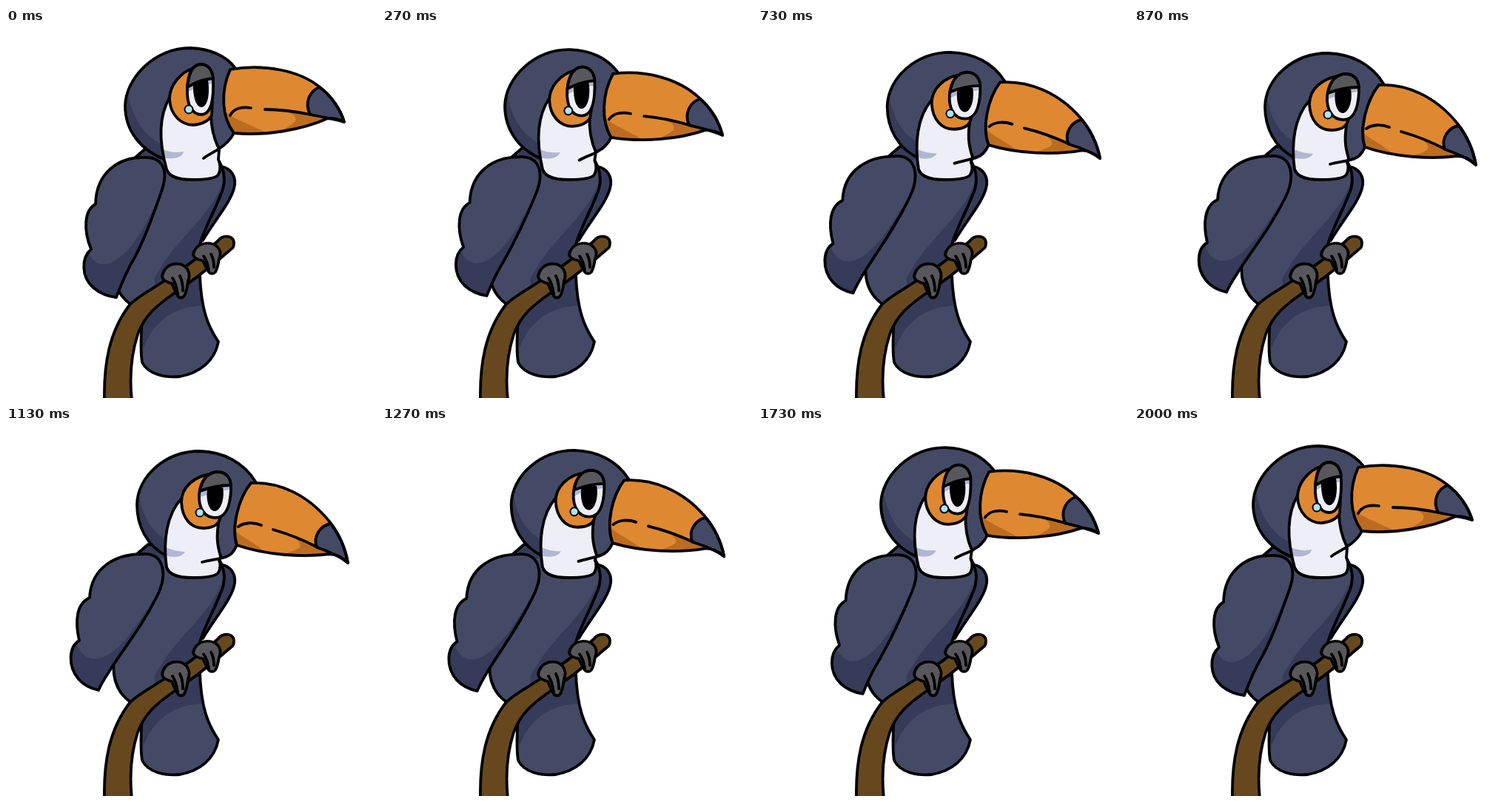
These frames come from a looping animation (500x500 px, 2070 ms). An HTML page:

```html
<!DOCTYPE html>
<html lang="en">
<head>
<meta charset="utf-8">
<title>Drowsy toucan</title>
<style>
  html, body { margin: 0; width: 100%; height: 100%; overflow: hidden; background: #fff; }
  svg { display: block; width: 100vw; height: 100vh; }
  .line { fill: none; stroke: #000; stroke-width: 3.8; stroke-linecap: round; stroke-linejoin: round; }
  .blue { fill: #444a65; }
  .navy { fill: #353b58; }
  .orange { fill: #de8832; }
  .rust { fill: #bc6c20; }
  .white { fill: #eeeef8; }
  .lilac { fill: #b1b7d2; }
</style>
</head>
<body>
<svg viewBox="0 0 500 500">
  <defs>
    <path id="back" d="M291 187C306 190 312 203 308 217C303 236 282 260 266 287L258 290L270 240Z"/>
    <path id="torso" d="M170 179L192 160L288 180C297 196 297 212 289 228C281 249 269 269 262 292L262 318C230 342 200 358 168 373C150 360 143 340 146 315C150 270 155 210 170 179Z"/>
    <path id="tail" d="M184 392C182 420 182 440 184 452C192 468 215 473 235 471C262 466 282 450 287 424C272 402 264 380 262 335L230 345Z"/>
    <path id="wing" d="M184 175C156 175 122 192 121 238C106 246 104 272 115 299C102 310 101 336 118 351C129 360 140 363 149 364C155 348 163 328 174 310C189 281 199 252 210 221C220 193 213 173 184 175Z"
      data-to="M184 173C150 173 115 190 113 232C95 240 93 264 99 290C85 298 83 324 98 342C105 350 116 355 125 357C130 345 137 336 145 323C165 293 185 268 203 232C220 200 213 170 184 173Z"/>
    <g class="turn">
      <path id="head" d="M216 178C181 165 161 138 161 105C162 68 200 27 249 27C275 28 295 36 309 53L308 142C303 152 296 158 288 163L267 176Z"
        data-to="M218 176C190 162 177 135 177 106C178 68 215 34 262 34C294 35 321 49 337 75L312 161C308 170 302 176 296 177L265 184Z"/>
      <path id="face" d="M221 94C206 120 207 155 217 191C221 202 234 205 252 205C272 205 284 203 287 198C290 193 290 184 287 178L288 164C281 150 277 135 277 116Z"
        data-to="M237 98C217 120 212 155 217 191C221 202 234 205 252 205C272 205 284 203 287 198C290 193 290 186 288 182L290 176C285 160 284 148 288 126Z"/>
      <path id="eye" d="M245 82C246 62 252 49 264 49C276 50 281 62 280 80C280 102 275 117 264 117C251 117 244 103 245 82Z"
        data-to="M261 92C263 74 272 62 287 62C300 63 304 74 304 86C303 108 297 124 283 124C268 124 260 111 261 92Z"/>
      <path id="beak" d="M303 56C350 48 398 58 424 80C440 92 452 110 457 127C450 123 443 122 435 122C400 138 350 146 308 142C291 120 290 85 303 56Z"
        data-to="M331 77C368 75 407 92 437 129C448 143 458 162 462 185C455 178 447 173 437 173C400 178 350 174 312 161C304 137 314 98 331 77Z"/>
    </g>
    <clipPath id="inTorso"><use href="#torso"/></clipPath>
    <clipPath id="inTail"><use href="#tail"/></clipPath>
    <clipPath id="inWing"><use href="#wing"/></clipPath>
    <clipPath id="inHead"><use href="#head"/></clipPath>
    <clipPath id="inFace"><use href="#face"/></clipPath>
    <clipPath id="inEye"><use href="#eye"/></clipPath>
    <clipPath id="inBeak"><use href="#beak"/></clipPath>
    <g id="foot">
      <path class="line" style="fill:#57575c" d="M211 335C214 322 224 317 235 319C246 322 250 332 246 342C245 350 244 356 241 362C238 366 233 365 231 360C228 356 226 349 224 345C219 344 211 341 211 335Z"/>
      <path class="line" d="M225 338C229 344 231 352 232 359M235 335C238 341 239 348 239 355"/>
    </g>
  </defs>

  <use href="#back" class="navy"/>
  <use href="#back" class="line"/>

  <use href="#tail" class="blue"/>
  <path class="navy" clip-path="url(#inTail)" d="M182 446C192 402 222 376 268 375L268 325L180 370Z"/>
  <use href="#tail" class="line"/>

  <use href="#torso" class="blue"/>
  <g class="navy" clip-path="url(#inTorso)">
    <path d="M165 182L192 158L222 178L190 180Z"/>
    <path d="M294 206C276 258 224 288 200 340L205 365L265 330L300 260Z"/>
  </g>
  <use href="#torso" class="line"/>

  <path class="line" style="fill:#67481e" d="M133 503C132 455 139 410 168 373C182 360 202 350 220 338C248 319 270 303 286 288C294 278 308 281 308 290C308 295 307 298 304 299L290 311C272 326 250 343 228 358C205 374 187 388 178 414C168 445 167 475 170 503Z"/>
  <use href="#foot"/>
  <use href="#foot" transform="translate(42 4) scale(1 .9)"/>

  <use href="#wing" class="blue"/>
  <path class="navy" clip-path="url(#inWing)"
    d="M109 296C118 332 152 328 186 270L214 215L190 330L150 380L90 370L90 310Z"
    data-to="M94 288C104 327 136 323 170 278L206 226L170 320L125 375L70 360L75 300Z"/>
  <use href="#wing" class="line"/>

  <g class="turn">
    <use href="#head" class="blue"/>
    <path class="navy" clip-path="url(#inHead)"
      d="M163 76C168 118 184 146 216 160L216 184L180 180L150 130Z"
      data-to="M178 80C182 118 194 144 222 156L222 182L190 175L165 130Z"/>
    <use href="#head" class="line"/>

    <use href="#face" class="white"/>
    <path class="lilac" clip-path="url(#inFace)"
      d="M208 162C218 168 229 169 240 167C238 176 225 178 211 175Z"
      data-to="M212 161C222 168 232 169 242 170C237 178 226 178 213 175Z"/>
    <use href="#face" class="line"/>
    <path class="line" d="M267 176C275 170 283 167 288 163" data-to="M265 184C275 181 288 180 297 177"/>

    <path class="line" style="fill:#de8832"
      d="M254 54C235 60 221 78 221 96C222 118 237 131 253 131C266 130 274 125 278 118L280 75Z"
      data-to="M276 65C255 68 237 82 237 103C238 125 250 138 266 138C278 138 285 135 288 128L303 90Z"/>
    <use href="#eye" class="white"/>
    <g clip-path="url(#inEye)">
      <path class="lilac" d="M243 80C255 72 266 69 282 68L282 75C266 76 255 80 243 89Z"
        data-to="M260 88C275 83 290 80 306 79L306 86C290 87 275 91 260 97Z"/>
      <path d="M253 73C262 70 268 70 273 71C276 90 272 107 264 107C256 107 252 90 253 73Z"
        data-to="M272 86C280 83 287 82 293 83C296 98 290 115 282 115C274 115 270 100 272 86Z"/>
    </g>
    <use href="#eye" class="line"/>
    <path class="line" style="fill:#57575c"
      d="M245 80C247 58 254 49 264 49C276 50 279 60 280 68C266 69 255 74 245 80Z"
      data-to="M262 88C265 70 275 62 287 62C298 63 303 70 304 80C290 80 275 83 262 88Z"/>
    <path class="line" style="stroke-width:13" d="M247 110L247 110" data-to="M262 117L262 117"/>
    <path class="line" style="stroke-width:9;stroke:#a9e6f2" d="M247 110L247 110" data-to="M262 117L262 117"/>

    <use href="#beak" class="orange"/>
    <g class="rust" clip-path="url(#inBeak)">
      <path d="M294 108C302 123 328 128 360 146L300 150Z" data-to="M306 136C314 150 334 154 354 174L305 170Z"/>
      <path d="M372 112C387 113 395 120 390 127C384 133 372 139 355 146L410 142L440 122L400 115Z"
        data-to="M378 146C394 152 401 160 396 165C390 169 380 171 362 177L414 182L442 174L404 156Z"/>
    </g>
    <path class="line" style="fill:#444a65"
      d="M424 80C410 85 403 101 411 117C427 120 443 123 457 127C452 110 440 92 424 80Z"
      data-to="M439 132C426 134 414 148 420 164C435 169 450 175 462 185C458 162 449 145 439 132Z"/>
    <use href="#beak" class="line"/>
    <path class="line" d="M303 118C308 108 320 106 331 108M350 110C370 110 392 113 412 117"
      data-to="M314 136C322 130 335 130 345 134M361 140C382 146 402 154 421 164"/>
  </g>
</svg>
<script>
  const LOOP = 2070, STEP = 200 / 3, HALF = 15;
  const REACH = 15 / 13;            // the drawn second pose lies just short of the deepest nod
  const NECK = [240, 200];

  const numbers = d => d.match(/-?[\d.]+/g).map(Number);
  const mix = (a, b, k) => a + (b - a) * k;

  const parts = [...document.querySelectorAll('[data-to]')].map(el => ({
    el,
    letters: el.getAttribute('d').split(/-?[\d.]+/),
    from: numbers(el.getAttribute('d')),
    to: numbers(el.dataset.to),
    move: el.closest('.turn') ? swing : slide
  }));

  function slide(x, y, u, v, k) {
    return [mix(x, u, k), mix(y, v, k)];
  }

  // Swing a point around the neck so that it follows an arc.
  function swing(x, y, u, v, k) {
    const [cx, cy] = NECK;
    const r = mix(Math.hypot(x - cx, y - cy), Math.hypot(u - cx, v - cy), k);
    const a = mix(Math.atan2(y - cy, x - cx), Math.atan2(v - cy, u - cx), k);
    return [cx + r * Math.cos(a), cy + r * Math.sin(a)];
  }

  function pose(k) {
    for (const { el, letters, from, to, move } of parts) {
      let d = letters[0];
      for (let i = 0; i < from.length; i += 2) {
        const [x, y] = move(from[i], from[i + 1], to[i], to[i + 1], k);
        d += x.toFixed(2) + letters[i + 1] + y.toFixed(2) + letters[i + 2];
      }
      el.setAttribute('d', d);
    }
  }

  const start = performance.now();
  let shown = -1;
  function tick() {
    const t = Math.max(0, performance.now() - start) % LOOP;
    const step = Math.min(2 * HALF, Math.floor((t + 4) / STEP));
    if (step !== shown) {
      shown = step;
      pose((1 - Math.abs(step - HALF) / HALF) * REACH);
    }
    requestAnimationFrame(tick);
  }
  tick();
</script>
</body>
</html>
```
